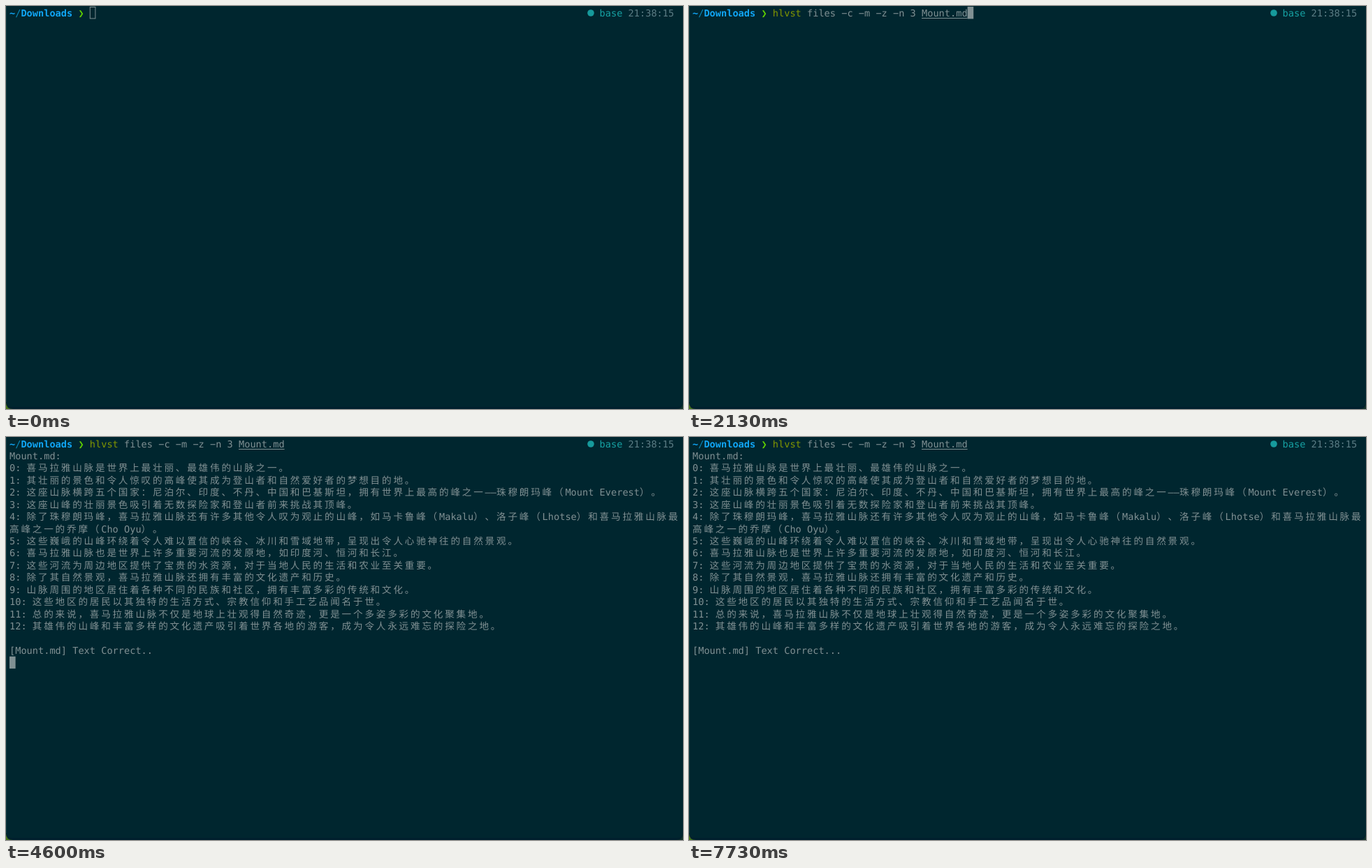
Write an HTML page that moves like this. It is 969 px wide and 578 px high and loops after 8 s.

```html
<!DOCTYPE html>
<html lang="zh-CN">
<head>
<meta charset="utf-8">
<title>Terminal</title>
<style>
  html, body { margin: 0; width: 100%; height: 100%; overflow: hidden; background: #00262f; }
  svg { display: block; width: 969px; height: 578px; }
  text {
    font: 13.6px "DejaVu Sans Mono", "Noto Sans CJK SC", "Noto Sans CJK", monospace;
    white-space: pre;
    text-spacing-trim: space-all;
    text-rendering: geometricPrecision;
    font-variant-ligatures: none;
  }
  .bold { font-weight: bold; }
</style>
</head>
<body>
<svg id="stage" viewBox="0 0 969 578" xmlns="http://www.w3.org/2000/svg">
  <defs>
    <linearGradient id="desk">
      <stop offset="0" stop-color="#4b7a1c"/>
      <stop offset="0.03" stop-color="#0a2a24"/>
      <stop offset="1" stop-color="#12332a"/>
    </linearGradient>
  </defs>
  <rect width="969" height="578" fill="url(#desk)"/>
  <path d="M0 0H969V568Q969 578 959 578H10Q0 578 0 568Z" fill="#001f2d"/>
  <path d="M0 0H969V566Q969 575 960 575H9Q0 575 0 566Z" fill="#00262f"/>
  <path d="M.5 0V568" stroke="#0d373e"/>
  <circle cx="837" cy="10" r="4.8" fill="#169a9c"/>
</svg>
<script>
const LOOP = 8000, LEFT = 5, CELL = 8.2, PITCH = 17.43, TOP = 1;
const GRAY = '#809093', BLUE = '#10a6f6', TEAL = '#16a2a4';
const stage = document.getElementById('stage');

const colX = col => LEFT + col * CELL;
const rowY = row => TOP + row * PITCH;

function set(el, attrs) {
  for (const key in attrs) el.setAttribute(key, attrs[key]);
}

function add(name, attrs, parent = stage) {
  const el = document.createElementNS('http://www.w3.org/2000/svg', name);
  set(el, attrs);
  return parent.appendChild(el);
}

// Chinese characters take two terminal cells
const cells = ch => /[\u3001-\u9fff\uff00-\uffef]/.test(ch) ? 2 : 1;

function write(str, col, row, fill = GRAY, parent = stage, cls = '') {
  const xs = [];
  for (const ch of str) {
    xs.push(colX(col).toFixed(1));
    col += cells(ch);
  }
  const el = add('text', { x: xs.join(' '), y: rowY(row) + 13.5, fill, class: cls }, parent);
  el.textContent = str;
  return el;
}

write('~', 0, 0, BLUE, stage, 'bold');
write('/', 1, 0, '#0a88b8');
write('Downloads', 2, 0, BLUE, stage, 'bold');
write('❯', 12, 0, '#5fd000');
write('base', 103, 0, TEAL);
write('21:38:15', 108, 0, '#5d7d85');

const command = add('g', {});
write('hlvst', 14, 0, '#839700', command);
// The minus sign gives the wide dash of the terminal font
write('files -c -m -z -n 3 Mount.md'.replaceAll('-', '−'), 20, 0, GRAY, command);
add('path', { d: `M${colX(40)} 17.5H${colX(48)}`, stroke: GRAY }, command);

const output = add('g', {});
[
  'Mount.md:',
  '0: 喜马拉雅山脉是世界上最壮丽、最雄伟的山脉之一。',
  '1: 其壮丽的景色和令人惊叹的高峰使其成为登山者和自然爱好者的梦想目的地。',
  '2: 这座山脉横跨五个国家：尼泊尔、印度、不丹、中国和巴基斯坦，拥有世界上最高的峰之一——珠穆朗玛峰（Mount Everest）。',
  '3: 这座山峰的壮丽景色吸引着无数探险家和登山者前来挑战其顶峰。',
  '4: 除了珠穆朗玛峰，喜马拉雅山脉还有许多其他令人叹为观止的山峰，如马卡鲁峰（Makalu）、洛子峰（Lhotse）和喜马拉雅山脉最',
  '高峰之一的乔摩（Cho Oyu）。',
  '5: 这些巍峨的山峰环绕着令人难以置信的峡谷、冰川和雪域地带，呈现出令人心驰神往的自然景观。',
  '6: 喜马拉雅山脉也是世界上许多重要河流的发原地，如印度河、恒河和长江。',
  '7: 这些河流为周边地区提供了宝贵的水资源，对于当地人民的生活和农业至关重要。',
  '8: 除了其自然景观，喜马拉雅山脉还拥有丰富的文化遗产和历史。',
  '9: 山脉周围的地区居住着各种不同的民族和社区，拥有丰富多彩的传统和文化。',
  '10: 这些地区的居民以其独特的生活方式、宗教信仰和手工艺品闻名于世。',
  '11: 总的来说，喜马拉雅山脉不仅是地球上壮观得自然奇迹，更是一个多姿多彩的文化聚集地。',
  '12: 其雄伟的山峰和丰富多样的文化遗产吸引着世界各地的游客，成为令人永远难忘的探险之地。'
].forEach((line, i) => write(line, 0, i + 1, GRAY, output));
write('[Mount.md] Text Correct', 0, 17, GRAY, output);
const dots = write('......', 23, 17, GRAY, output);

const cursor = add('rect', {});

// Moments at which the cursor turns off, on, off, ...
const BLINKS = [670, 1170, 1670, 2130, 2700, 3170, 3830, 4180, 4700, 5200, 5690, 6190, 6700, 7220, 7710];
const TYPED = 1870, ENTER = 2700, PRINTED = 3765, DOT_STEP = 492;

const show = (el, on) => el.setAttribute('visibility', on ? 'visible' : 'hidden');

function drawCursor(t) {
  const hollow = t < 30;
  const [col, row] = t < TYPED ? [14, 0] : t < ENTER ? [48, 0] : t < PRINTED ? [0, 1] : [0, 18];
  const inset = hollow ? 0.5 : 0;
  set(cursor, {
    x: colX(col) + inset,
    y: rowY(row) + inset,
    width: CELL + 0.4 - 2 * inset,
    height: PITCH - 2 * inset,
    fill: hollow ? 'none' : GRAY,
    stroke: hollow ? GRAY : 'none'
  });
  show(cursor, BLINKS.filter(b => b <= t).length % 2 === 0);
}

function render(t) {
  show(command, t >= TYPED);
  show(output, t >= PRINTED);
  const step = Math.max(0, Math.floor((t - PRINTED) / DOT_STEP));
  dots.textContent = '.'.repeat(step % 6 + 1);
  drawCursor(t);
}

let start;
function tick(now) {
  start ??= now;
  render((now - start) % LOOP);
  requestAnimationFrame(tick);
}
render(0);
requestAnimationFrame(tick);
</script>
</body>
</html>
```
